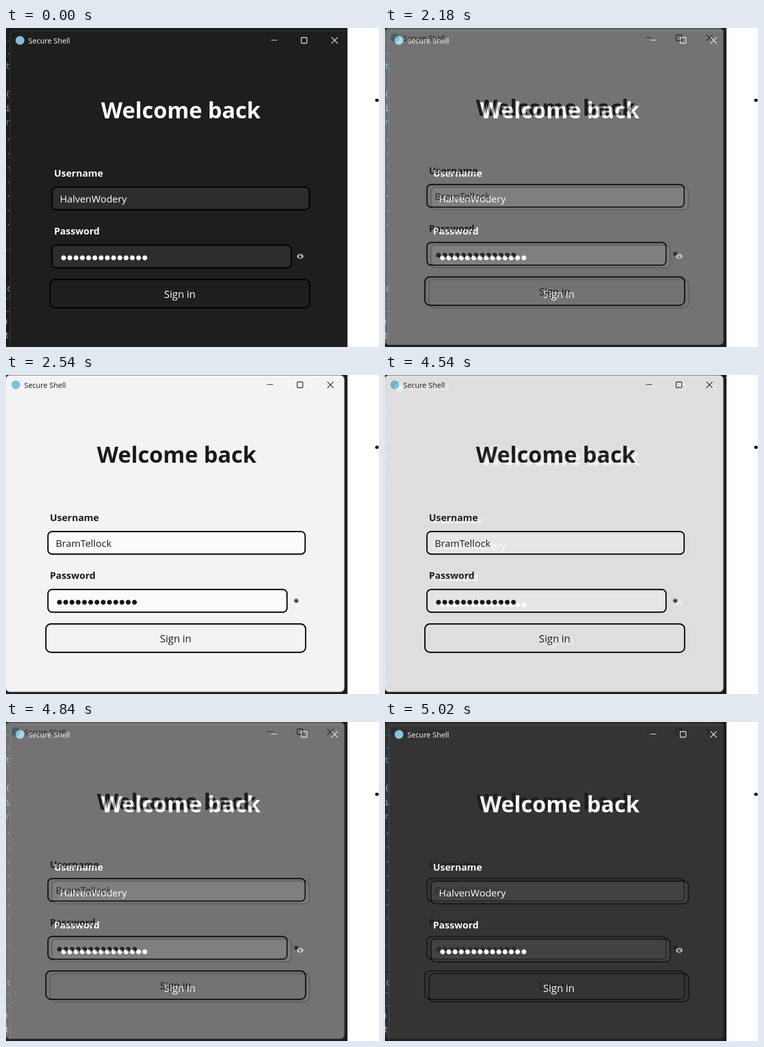
Animation of 722 by 618 pixels, one loop 5080 ms. Source, as an HTML page:

```html
<!DOCTYPE html>
<html lang="en">
<head>
<meta charset="utf-8">
<title>Sign-in themes</title>
<style>
  html, body { margin: 0; width: 100%; height: 100%; overflow: hidden; background: #fff; }
  svg { display: block; width: 722px; height: 618px; }
  text { font-family: "Open Sans", "Noto Sans", sans-serif; white-space: pre; }
  .code { font-family: "DejaVu Sans Mono", "Noto Sans Mono", monospace; font-size: 15px; }
</style>
</head>
<body>
<svg id="stage" viewBox="0 0 722 618" xmlns="http://www.w3.org/2000/svg"></svg>
<script>
const HOLD = 2000, STEP = 60, STEPS = 9;
const HALF = HOLD + STEP * STEPS;

const themes = {
  dark: {
    x: 8, y: 5, width: 700, height: 640, user: "HalvenWodery", dots: 14,
    page: "#1e1e1e", field: "#2d2d2d", ink: "#fff", border: "#444", icon: "#7fc0dc",
    sclera: "#e6dada", lid: "#b99a9c", eyeWidth: 5.8, iris: 0
  },
  light: {
    x: 0, y: 0, width: 655, height: 613.5, user: "BramTellock", dots: 13,
    page: "#f3f3f3", field: "#fbfbfb", ink: "#1a1a1a", border: "#777", icon: "#7fc0dc",
    sclera: "#d3b3b3", lid: "#bd9696", eyeWidth: 4.6, iris: 0.8
  }
};

const label = (x, y, size, content, extra = "") =>
  `<text x="${x}" y="${y}" font-size="${size}" ${extra}>${content}</text>`;

const box = (x, y, width, height, radius, fill) =>
  `<rect x="${x}" y="${y}" width="${width}" height="${height}" rx="${radius}"
    fill="${fill}" stroke="#000" stroke-width="2.4"/>`;

function eye(t) {
  return `<g transform="translate(561.5 437.3)">
    <ellipse rx="${t.eyeWidth}" ry="4.3" fill="${t.sclera}" stroke="${t.lid}" stroke-width=".8"/>
    <circle cx="${t.iris}" r="3.4" fill="#593a3c"/>
    <circle cx="${t.iris}" r="1.8" fill="#211718"/>
    <circle cx="${t.iris + 0.8}" cy="-1.2" r=".9" fill="#eee"/>
  </g>`;
}

function loginWindow(t) {
  const bullets = Array.from({ length: t.dots }, (_, i) =>
    `<circle cx="${103.5 + 12.1 * i}" cy="440.3" r="4.7"/>`).join("");
  return `<g transform="translate(${t.x} ${t.y})" fill="${t.ink}">
    <rect x="-.5" y=".5" width="${t.width + 0.5}" height="${t.height}" rx="8"
      fill="${t.page}" stroke="${t.border}"/>
    <circle cx="19" cy="19" r="8.6" fill="${t.icon}"/>
    ${label(35.3, 24.5, 14.3, "Secure Shell")}
    <path d="M505 18.5h12M622 13l12 12M634 13l-12 12" fill="none" stroke="${t.ink}" stroke-width="1.2"/>
    <rect x="563.5" y="13.5" width="11" height="11" rx="1.5" fill="none" stroke="${t.ink}" stroke-width="1.3"/>
    ${label(176, 170, 43, "Welcome back", 'font-weight="700"')}
    ${label(85, 283, 18.5, "Username", 'font-weight="700"')}
    ${box(81.2, 303.2, 497.8, 43.8, 8, t.field)}
    ${label(96.3, 333, 19, t.user)}
    ${label(85, 395, 18.5, "Password", 'font-weight="700"')}
    ${box(81.2, 415.5, 462.8, 44, 8, t.field)}
    ${bullets}
    ${eye(t)}
    ${box(77.2, 482.2, 502.8, 55, 10, t.page)}
    ${label(328.5, 518, 19.7, "Sign in", 'text-anchor="middle"')}
  </g>`;
}

// Sliver of a code editor behind the window's left edge.
function editor() {
  const glyph = (x, y, content, fill) =>
    `<text class="code" x="${x}" y="${y}" fill="${fill}">${content}</text>`;
  const dots = ["#7fa8bd", "#6f9f92", "#9a8f88", "#96897f", "#8c9590", "#80908f", "#908e86"]
    .map((fill, i) => glyph(0, 217 + 27.5 * i, ".", fill)).join("");
  return `<rect width="661" height="618" fill="#1b1b1b"/>
    <rect y="430" width="8" height="1" fill="#444"/>
    <rect y="482" width="8" height="5" fill="#101010"/>
    <rect y="524" width="8" height="1.5" fill="#245a80"/>
    ${glyph(-1, 22, "_", "#3a9c8b")}${glyph(0, 51, ".", "#4c9c8c")}
    ${glyph(-1, 79, "t", "#3fa493")}${glyph(-1, 133, "(", "#aaa")}
    ${glyph(-1, 161, "i", "#aaa")}${glyph(-1, 188, "r", "#3fa493")}
    ${dots}
    ${glyph(-7, 510, "Co", "#999")}${glyph(-1, 546, "_", "#aaa")}
    ${glyph(-4, 574, ")", "#aaa")}${glyph(-3, 601, "t", "#b5a698")}`;
}

document.getElementById("stage").innerHTML = `
  ${editor()}
  ${loginWindow(themes.dark)}
  <g id="light">${loginWindow(themes.light)}</g>
  <rect x="661" width="61" height="618" fill="#fff"/>
  <ellipse cx="718" cy="140" rx="3.4" ry="3.1"/>`;
const light = document.getElementById("light");

// Each half holds one theme, then blends to the other in tenths.
function render(time) {
  const local = time % HALF;
  const mix = local < HOLD ? 0 : (Math.floor((local - HOLD) / STEP) + 1) / (STEPS + 1);
  const showsLight = time % (2 * HALF) >= HALF;
  light.setAttribute("opacity", showsLight ? 1 - mix : mix);
}

const start = performance.now();
function tick() {
  render(performance.now() - start);
  requestAnimationFrame(tick);
}
tick();
</script>
</body>
</html>
```
